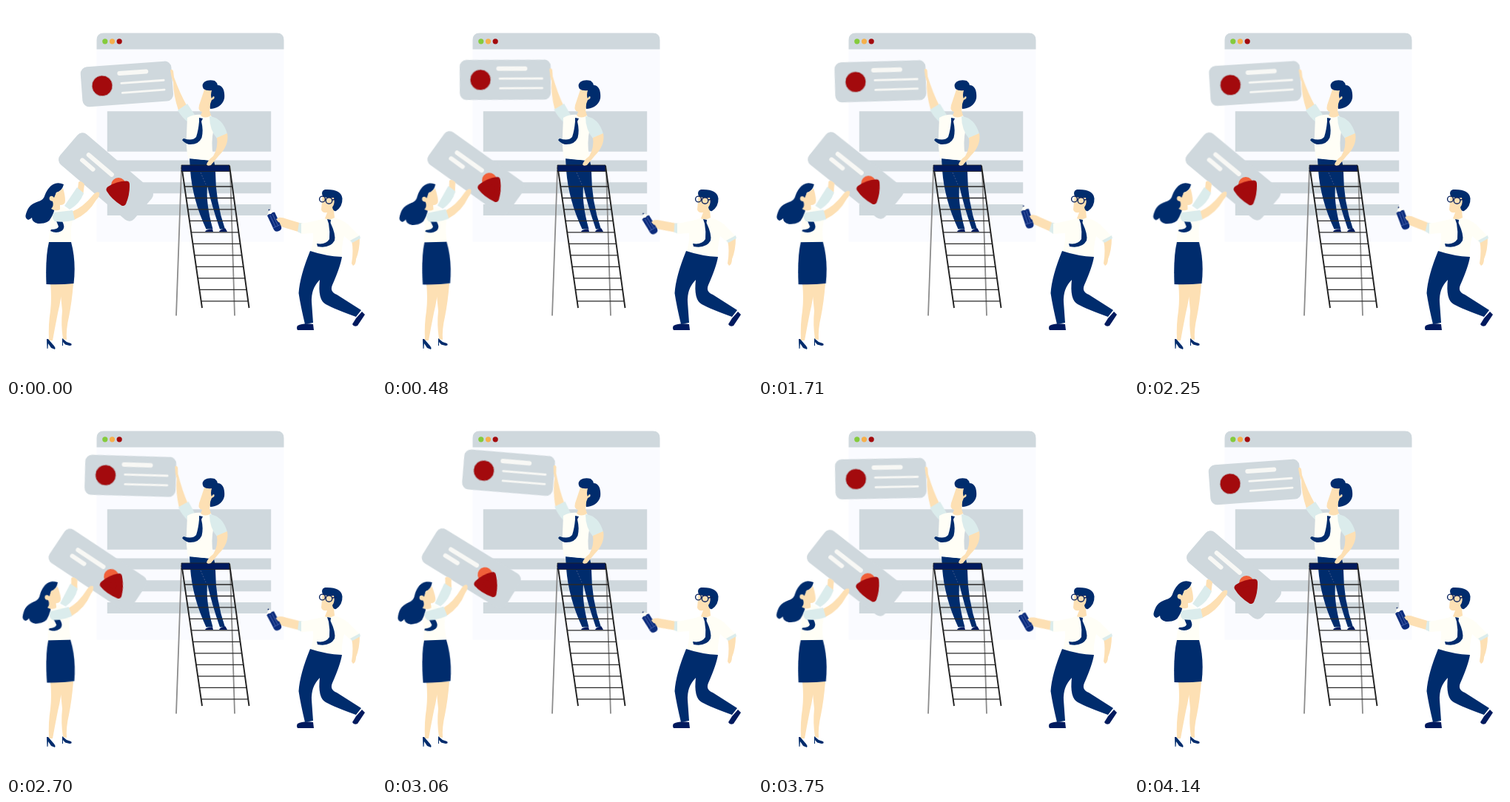
These frames come from a looping animation (500x500 px, 4.17 s). An HTML page:

```html
<!DOCTYPE html>
<html lang="en">
<head>
<meta charset="utf-8">
<title>Building a page</title>
<style>
  html, body { margin: 0; width: 100%; height: 100%; overflow: hidden; background: #fff; }
  svg { display: block; width: 100%; height: 100%; }
  .navy { fill: #002c6d; }
  .dark { fill: #001a5e; }
  .skin { fill: #fde0b4; }
  .shirt { fill: #fffef6; }
  .cuff { fill: #dbecec; }
  .grey { fill: #cfd8dd; }
  .red { fill: #a30a0d; }
  .text { stroke: #f8f8f5; stroke-linecap: round; fill: none; }

  .lift { transform-origin: 248px 148px; animation: lift 1042.5ms cubic-bezier(.37, 0, .63, 1) infinite alternate; }
  .hips, .torso, .arms, .badge { animation: 2085ms cubic-bezier(.37, 0, .63, 1) infinite; }
  .hips { transform-origin: 74px 348px; animation-name: hips; }
  .torso { transform-origin: 73px 320px; animation-name: torso; }
  .arms { transform-origin: 72px 285px; animation-name: arms; }
  .badge { transform-origin: 154px 252px; animation-name: badge; }
  .draw { transform-origin: 400px 300px; animation: draw 4170ms cubic-bezier(.4, .1, .6, .9) infinite; }

  @keyframes lift { to { transform: rotate(9deg); } }
  @keyframes hips { 43%, 53% { transform: rotate(-2.2deg); } 95%, 100% { transform: none; } }
  @keyframes torso { 43%, 53% { transform: rotate(-4.5deg); } 95%, 100% { transform: none; } }
  @keyframes arms { 43%, 53% { transform: rotate(-2.2deg); } 95%, 100% { transform: none; } }
  @keyframes badge { 43%, 53% { transform: translate(0, 4px) rotate(-3deg); } 95%, 100% { transform: none; } }
  @keyframes draw {
    0%, 100% { transform: rotate(0deg); }
    11.5% { transform: rotate(-6.4deg); }
    24.5% { transform: rotate(-11.6deg); }
    41% { transform: rotate(7deg); }
    47% { transform: rotate(8deg); }
    64.7% { transform: rotate(-2.5deg); }
    78% { transform: rotate(-9deg); }
    82% { transform: rotate(-8.4deg); }
  }
</style>
</head>
<body>
<svg viewBox="0 0 500 500">
  <!-- browser window -->
  <path fill="#fafbff" d="M122.500 58H375.500V318.500H122.500Z"/>
  <path class="grey" d="M122.500 58.500V46Q122.500 36.500 132 36.500H366Q375.500 36.500 375.500 46V58.500Z"/>
  <circle cx="133.800" cy="47.800" r="3.600" fill="#84cb3c"/>
  <circle cx="143.500" cy="47.800" r="3.600" fill="#f5b04c"/>
  <circle cx="153.200" cy="47.800" r="3.600" class="red"/>
  <path class="grey" d="M136.800 142.200H358.200V196.800H136.800ZM136.800 208.500H358.200V223.500H136.800ZM136.800 238.300H358.200V253.300H136.800ZM136.800 268H358.200V283H136.800Z"/>

  <!-- ladder and man on it -->
  <path class="navy" d="M248 205.500L281 209.500Q283 216 283 224Q283 264 296 301.500L289 301.500Q278 270 272 243Q270 268 279.500 301.500L270.500 301.500Q252 262 249 222Z"/>
  <path class="dark" d="M269 305Q270 301.500 279 301.500L280 305ZM288 305Q289 301.500 296.500 300.500L299 305Z"/>
  <path fill="none" stroke="#53648f" stroke-width=".8" stroke-dasharray="2 2" d="M263 225L270 241"/>
  <g fill="none">
    <path stroke="#8c8c8c" stroke-width="1.8" d="M237 222L230 418.500M303 222L309 418.500"/>
    <path id="rungs" stroke="#2a2a2a" stroke-width="1.3"/>
    <path stroke="#222" stroke-width="1.9" d="M237.500 218L265 408M302 216L328.500 408"/>
  </g>
  <path class="dark" stroke="#222" stroke-width=".8" d="M237 215H302V223.500H237Z"/>

  <g class="lift">
    <g transform="translate(163.400 105.400) rotate(-4.2)">
      <rect class="grey" x="-61.500" y="-27" width="123" height="54" rx="9"/>
      <circle cx="-33.500" r="13.900" class="red" stroke="#b9aeb2" stroke-width=".8"/>
      <path class="text" stroke-width="6" d="M-9 -15H27"/>
      <path class="text" stroke-width="2.800" d="M-7.500 -1.500H50M-7 11.500H50"/>
    </g>
    <path class="skin" d="M222 87Q224 84 226 88L227 96Q235 118 244 134L233 141Q226 120 226 103Q223 96 222 87Z"/>
    <path class="cuff" d="M232 141L245 132L255 147L246 157Q238 151 232 141Z"/>
  </g>
  <path class="shirt" d="M245 151Q254 146 264 147L277 148Q283 160 279 176Q277 195 282 209Q264 208 246 206Q243 190 244 174Z"/>
  <path class="cuff" d="M275 149Q293 151 299 173L285 179Q275 167 275 149Z"/>
  <path class="skin" d="M285 178L299 172Q302 188 287 203L277 215Q272 217 271 214Q273 208 280 203Q287 191 285 178Z"/>
  <path class="skin" d="M268 113L280 113L282 126Q277 132 275 141L277 148Q269 153 263 148L265 143Q259 142 261 134Z"/>
  <path class="navy" d="M267 112C262 104 271 98 282 101Q285 103 286 107C294 107 296 117 295 125C293 134 284 139 276 139Q275 133 278 127Q283 125 281 122Q279 122 278 125Q276 121 278 114Q271 115 267 112Z"/>
  <path class="navy" d="M261 151L266 152L264 156Q267 168 264.500 178Q260 188 247 187Q241 185 238 181L240 179Q252 183 257 177Q260 168 261 156Z"/>

  <!-- woman carrying a card -->
  <path class="skin" d="M60 375H76Q75 395 70 415Q66 435 63 452L58 452Q57 430 60 412Q62 395 60 375Z"/>
  <path class="skin" d="M71 375H91Q89 400 85 420Q81 437 82 451L77 450Q74 430 76 412Q75 394 71 375Z"/>
  <path class="navy" d="M55 450H57L63 457Q68 462 66 464L61 462L57 456L56.500 463H55.500ZM76 449L82 454L88 456Q90 459 86 459L80 457.500L77 454V459H76Z"/>
  <g class="hips">
    <g class="torso">
      <g class="arms">
        <g transform="translate(135 231) rotate(40.500)">
          <rect class="grey" x="-66" y="-27" width="132" height="54" rx="9"/>
          <path class="text" stroke-width="6" d="M-37 -7.500H4M-39 3.500H-20"/>
        </g>
        <circle cx="152" cy="242" r="10" fill="#f0603a"/>
        <path class="badge red" stroke="#a30a0d" stroke-width="9" stroke-linejoin="round" d="M140 248Q151 241 162.500 241Q163 254 158 265.500Q146 258 140 248Z"/>
        <path class="skin" d="M97 247L98 238Q101 235 106 241L104 256Z"/>
        <path class="cuff" d="M79 270L96 245L105 253Q100 267 86 275Z"/>
      </g>
      <path class="shirt" d="M61 273Q72 268 80 273Q89 279 90 290Q86 305 89 321L57 321Q60 300 60 285Z"/>
      <path class="navy" d="M78 241Q66 236 58 246C50 256 54 261 44 264C31 268 29 275 27 281Q25 287 30 289Q33 288 35 286Q35 292 43 294Q57 295 61 286Q68 275 64 266L68 252Q76 250 78 241Z"/>
      <path class="skin" d="M68 252Q74 250 77 246Q80 256 80 263Q80 269 73 269L73 275Q67 278 61 274Q65 270 63 264Q57 263 59 258Q62 255 65 259Z"/>
      <path class="navy" d="M67 288H74Q82 299 75 304Q68 308 60 304L61 302Q70 302 71 298Z"/>
      <g class="arms">
        <path class="skin" d="M89 278Q104 272 117 256Q122 250 126 252Q127 257 122 262Q111 281 92 289Z"/>
        <path class="cuff" d="M65 279L90 276L93 289Q80 293 66 291Q60 285 65 279Z"/>
      </g>
    </g>
    <path class="navy" d="M58 319H88Q95 345 91.500 375Q72 377 54.500 376Q53 340 58 319Z"/>
  </g>

  <!-- man with a pencil -->
  <g class="draw">
    <path class="skin" d="M400 294L380 288Q372 285 368 286L364 290L370 297Q374 299 378 300L398 306Z"/>
    <g transform="translate(355.500 275.500) rotate(-25)">
      <path fill="#fffef6" d="M0 0L5.500 6H-5.500Z"/>
      <circle r=".9" class="dark"/>
      <path fill="#0c2c7c" d="M-5.500 6L-2.700 5L0 6L2.700 5L5.500 6V27Q5 31.500 0 31.500T-5.500 27Z"/>
      <path fill="none" stroke="#4c66b0" stroke-width=".8" d="M-1.800 7V24M1.800 7V24M-5.500 24.500H5.500"/>
    </g>
    <path class="skin" d="M365 288Q369 285 373 287L376 294L368 292Z"/>
    <path class="cuff" d="M396 293L402 294L400 308L394 305Z"/>
  </g>
  <path class="skin" d="M467 317L478 313Q478 330 473 342Q473 349 469 351L467 348Q470 330 467 317Z"/>
  <path class="shirt" d="M399 294Q417 291 430 287L444 286Q460 291 466 299L478 311L466 319L457 311Q453 325 454 341L411 333Q416 320 415 307L399 308Z"/>
  <path class="cuff" d="M478 310L479 314L468 320L465 317Z"/>
  <path class="navy" d="M411 331Q432 338 454 339Q452 352 441 377Q437 386 447 390L480 411L473 420Q445 410 432 403Q421 397 424 370Q412 382 413 400L415 428L404 430Q398 405 395.500 388Q397 365 411 331Z"/>
  <path class="dark" d="M394 432Q402 428 415 430L416 438H394Q392 435 394 432ZM481 413L485 417L475 432Q470 434 468 430L473 422Z"/>
  <path class="skin" d="M428 254L446 258L443 276L444 286Q437 290 431 287L434 279Q427 280 426 275Z"/>
  <path class="navy" d="M428 257Q425 250 431 248Q453 247 454.500 260Q455 271 446 277Q442 278 441 272Q445 267 443 259Q433 260 428 257Z"/>
  <g fill="none" stroke="#0c255f" stroke-width="1.4">
    <circle cx="427.500" cy="261" r="3.900"/>
    <circle cx="436.500" cy="263" r="4.300"/>
    <path d="M441 262L447 261"/>
  </g>
  <path class="navy" d="M434 288L439 289L438.500 293Q446 309 444 317Q438 328 421 325L420 321Q432 323 437 315Q438 305 436 294Z"/>
</svg>
<script>
  // Rungs run between the two slanted front rails.
  let d = "";
  for (let i = 0; i < 11; i++) {
    const y = 244 + i * 15.48;
    d += `M${237.5 + (y - 218) * 0.145} ${y}L${302 + (y - 216) * 0.138} ${y}`;
  }
  document.getElementById("rungs").setAttribute("d", d);
</script>
</body>
</html>
```
